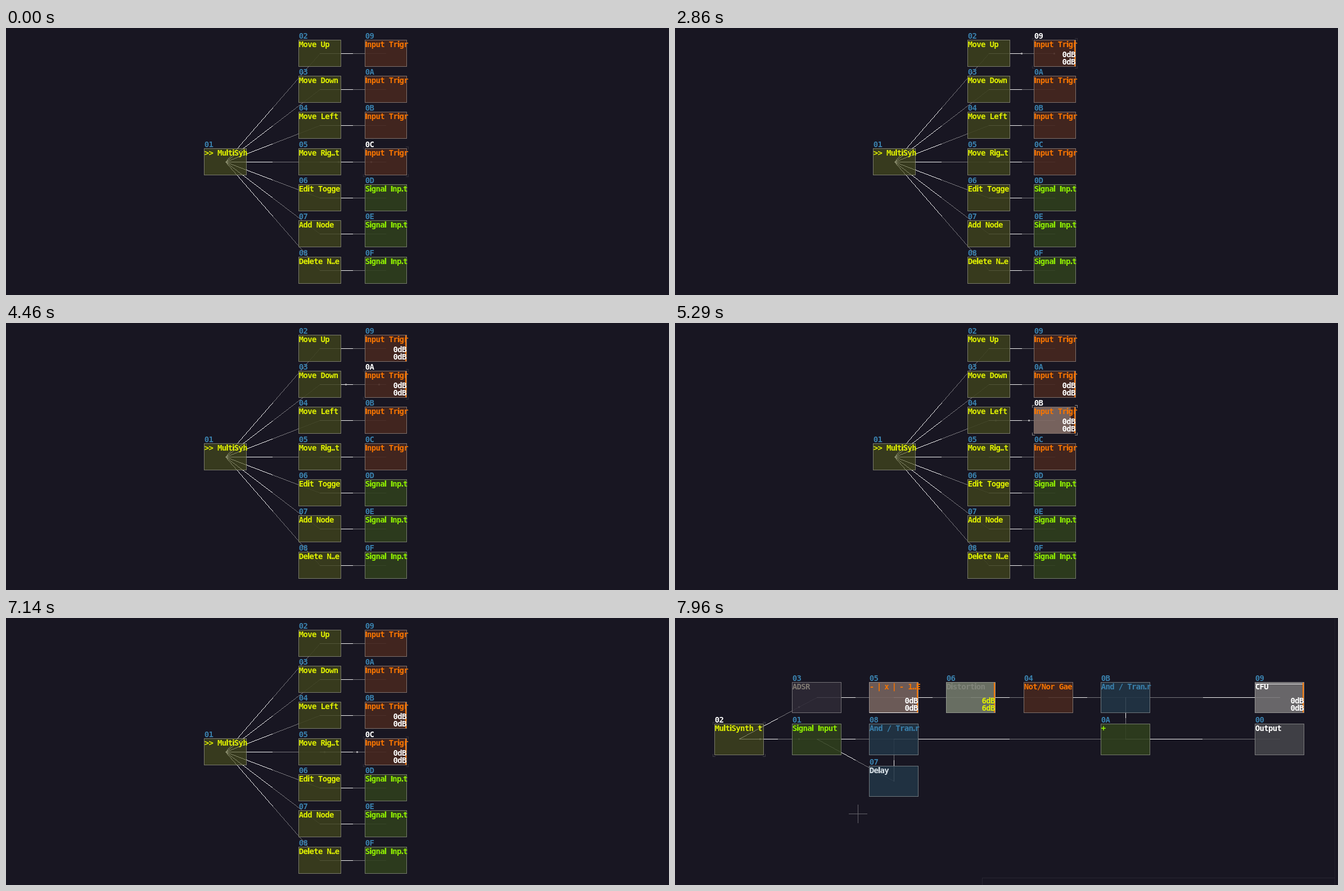
An HTML page with a canvas for the animation above (8000 ms loop, 1179x475 px).

```html
<!DOCTYPE html>
<html lang="en">
<head>
<meta charset="utf-8">
<title>Node graph</title>
<style>
html, body { margin: 0; width: 100%; height: 100%; overflow: hidden; background: #181622; }
canvas { display: block; }
</style>
</head>
<body>
<canvas id="stage" width="1179" height="475"></canvas>
<script>
const ctx = document.getElementById('stage').getContext('2d');
const LOOP = 8000, SWITCH = 7480, FADE = 1100, SCROLL = 0.18;
const YELLOW = '#dff000', ORANGE = '#f87500', GREEN = '#90f000', BLUE = '#3a80ac', WHITE = '#fff';
const OLIVE = '#3c3f1d', BROWN = '#47271f', MOSS = '#2f3f1d', NAVY = '#213546';

const clamp = v => Math.max(0, Math.min(1, v));
const node = (id, x, y, title, color, fill, more) => ({ id, x, y, title, color, fill, alpha: 0.88, ...more });

// Trigger nodes: pressed, released and silent again (ms)
const presses = [
  { on: 950, off: 1250, end: 4500 },
  { on: 2900, off: 3750, end: 6200 },
  { on: 4850, off: 5245, end: 9000 },
  { on: 5740, off: 5980, end: 9000 }
];

const rowY = i => Math.floor(21.1 + 64.33 * i);
const moves = ['Move Up', 'Move Down', 'Move Left', 'Move Rig..t', 'Edit Togge', 'Add Node', 'Delete N..e'];
const keys = {
  w: 75.9, h: 48,
  nodes: [node('01', 352, 214, '>> MultiSyh', YELLOW, '#494d1c', { alpha: 0.65 })],
  wires: []
};
moves.forEach((title, i) => {
  const move = '0' + (i + 2), input = '0' + '9ABCDEF'[i], y = rowY(i);
  keys.nodes.push(node(move, 520, y, title, YELLOW, OLIVE));
  keys.nodes.push(i < 4
    ? node(input, 637.5, y, 'Input Trigr', ORANGE, BROWN, { press: presses[i] })
    : node(input, 637.5, y, 'Signal Inp.t', GREEN, MOSS));
  keys.wires.push(['01', move], [move, input]);
});

const cell = (id, col, row, ...rest) => node(id, 128.9 + 137.3 * col, 97.4 + 74.6 * row, ...rest);
const synth = {
  w: 88, h: 55.4,
  nodes: [
    cell('02', 0, 1, 'MultiSynth t', YELLOW, '#494d1c', { alpha: 0.65 }),
    cell('03', 1, 0, 'ADSR', '#7f7972', '#2e2a36'),
    cell('01', 1, 1, 'Signal Input', GREEN, MOSS),
    cell('05', 2, 0, '- | x | - 1..E', ORANGE, '#77645f', { db: '0dB', line: 54 }),
    cell('08', 2, 1, 'And / Tran.r', BLUE, NAVY),
    cell('07', 2, 2, 'Delay', '#dbe4ea', NAVY),
    cell('06', 3, 0, 'Distortion', '#82867c', '#737a6b', { db: '6dB', dbColor: YELLOW }),
    cell('04', 4, 0, 'Not/Nor Gae', ORANGE, BROWN),
    cell('0B', 5, 0, 'And / Tran.r', BLUE, NAVY),
    cell('0A', 5, 1, '+', GREEN, MOSS),
    cell('09', 7, 0, 'CFU', WHITE, '#737173', { db: '0dB', line: 3 }),
    cell('00', 7, 1, 'Output', WHITE, '#45454a')
  ],
  wires: [
    ['02', '03'], ['02', '01'], ['03', '05'], ['05', '06'], ['06', '04'], ['04', '0B'],
    ['09', '0B'], ['0B', '0A'], ['01', '08'], ['01', '07'], ['07', '08'], ['08', '0A'], ['0A', '00']
  ]
};

function rect(x, y, w, h, color) {
  ctx.fillStyle = color;
  ctx.fillRect(x, y, w, h);
}

// Nearly monospaced text with a narrow advance for thin letters
const isThin = c => 'Iil.|'.includes(c);
const advance = c => isThin(c) ? 3.3 : 7.75;

function text(str, x, y, color) {
  ctx.fillStyle = color;
  ctx.textAlign = 'center';
  for (const c of str) {
    ctx.font = isThin(c) ? 'bold 14px "DejaVu Sans", sans-serif' : 'bold 14px "DejaVu Sans Mono", monospace';
    ctx.fillText(c, x + advance(c) / 2, y);
    x += advance(c);
  }
}

function textRight(str, x, y, color) {
  const width = [...str].reduce((sum, c) => sum + advance(c), 0);
  text(str, x - width, y, color);
}

// The half of a wire next to its first node is white, the rest grey
function wire(ax, ay, bx, by) {
  const dx = bx - ax, dy = by - ay, n = Math.max(Math.abs(dx), Math.abs(dy));
  for (let i = 0; i <= n; i++) {
    rect(Math.round(ax + dx * i / n), Math.round(ay + dy * i / n), 1, 1, i < n / 2 ? '#f4f4f4' : '#77767b');
  }
}

function dots(ax, ay, bx, by, t) {
  const u = (t / 2000 + 0.56) % 1;
  for (let k = 0; k < 2; k++) {
    const f = (k + u) / 2;
    rect(Math.round(ax + (bx - ax) * f) - 1, Math.round(ay + (by - ay) * f) - 1, 3, 3, '#a5a4a8');
  }
}

function brackets(x, y, w, h, glow) {
  const l = x - 3, r = x + w + 2, top = y - 3, b = y + h + 2;
  const color = `rgba(200,200,196,${0.14 + 0.86 * glow})`;
  for (const [cx, sx] of [[l, 1], [r, -1]]) {
    for (const [cy, sy] of [[top, 1], [b, -1]]) {
      rect(sx > 0 ? cx : cx - 4, cy, 5, 1, color);
      rect(cx, sy > 0 ? cy + 1 : cy - 4, 1, 4, color);
    }
  }
}

function gate(x, y, w, h, press, t) {
  const right = x + w - 1;
  const from = Math.max(x + 1, right - SCROLL * (t - press.on));
  const to = right - SCROLL * Math.max(0, t - press.off);
  if (to <= from) return;
  rect(from, y + 1, to - from, h - 1, 'rgba(255,255,255,.28)');
  if (t < press.off) rect(from, y + 3, to - from, 1, '#e8e4e2');
}

function drawNode(n, size, t, selected, glow) {
  const x = Math.round(n.x), y = Math.round(n.y);
  const w = Math.round(n.x + size.w) - x, h = Math.round(n.y + size.h) - y;
  const live = n.press && t >= n.press.on && t < n.press.end;
  const db = live ? '0dB' : n.db;
  ctx.globalAlpha = n.alpha;
  rect(x, y, w, h, n.fill);
  ctx.globalAlpha = 1;
  ctx.strokeStyle = 'rgba(195,195,190,.48)';
  ctx.strokeRect(x + 0.5, y + 0.5, w - 1, h - 1);
  if (live) gate(x, y, w, h - 1, n.press, t);
  if (n.line) rect(x + 1, y + n.line, w - 2, 1, '#efeeee');
  if (db) rect(x + w - 3, y + 1, 2, h - 2, ORANGE);
  text(n.id, x + 1, y - 2, selected ? WHITE : BLUE);
  text(n.title, x + 1, y + 13, n.color);
  if (db) {
    const color = n.dbColor || WHITE;
    textRight(db, x + w - 1, y + h - 17, color);
    textRight(db, x + w - 1, y + h - 4, color);
  }
  if (selected) brackets(x, y, w, h, glow);
}

function drawGraph(graph, t, selected, glow, panX = 0, panY = 0) {
  const nodes = graph.nodes.map(n => ({ ...n, x: n.x + panX, y: n.y + panY }));
  const center = id => {
    const n = nodes.find(n => n.id === id);
    return [Math.round(n.x + graph.w / 2), Math.floor(n.y + graph.h / 2)];
  };
  for (const [a, b] of graph.wires) {
    const ends = [...center(a), ...center(b)];
    wire(...ends);
    if (a === selected || b === selected) dots(...ends, t);
  }
  for (const n of nodes) drawNode(n, graph, t, n.id === selected, glow);
}

function cross(x, y) {
  rect(x - 16, y, 33, 1, '#65646b');
  rect(x, y - 16, 1, 33, '#65646b');
}

function draw(t) {
  rect(0, 0, 1179, 475, '#181622');
  if (t < SWITCH) {
    const last = presses.findLastIndex(p => t >= p.on);
    const glow = last < 0 ? 0 : clamp(1 - (t - presses[last].on) / FADE);
    drawGraph(keys, t, last < 0 ? '0C' : '0' + '9ABC'[last], glow);
    return;
  }
  const pan = clamp((t - 7540) / 420);
  if (t >= 7750) {
    rect(546, 462, 628, 1, '#282632');
    rect(546, 462, 1, 13, '#282632');
    rect(1173, 0, 1, 475, '#211f2b');
  }
  drawGraph(synth, t, '02', clamp(1 - (t - 6950) / FADE), -58.6 * pan, 16.2 * pan);
  cross(Math.round(361 - 36 * pan), Math.round(365 - 17 * pan));
}

const start = performance.now();
function tick() {
  draw((performance.now() - start) % LOOP);
  requestAnimationFrame(tick);
}
tick();
</script>
</body>
</html>
```
